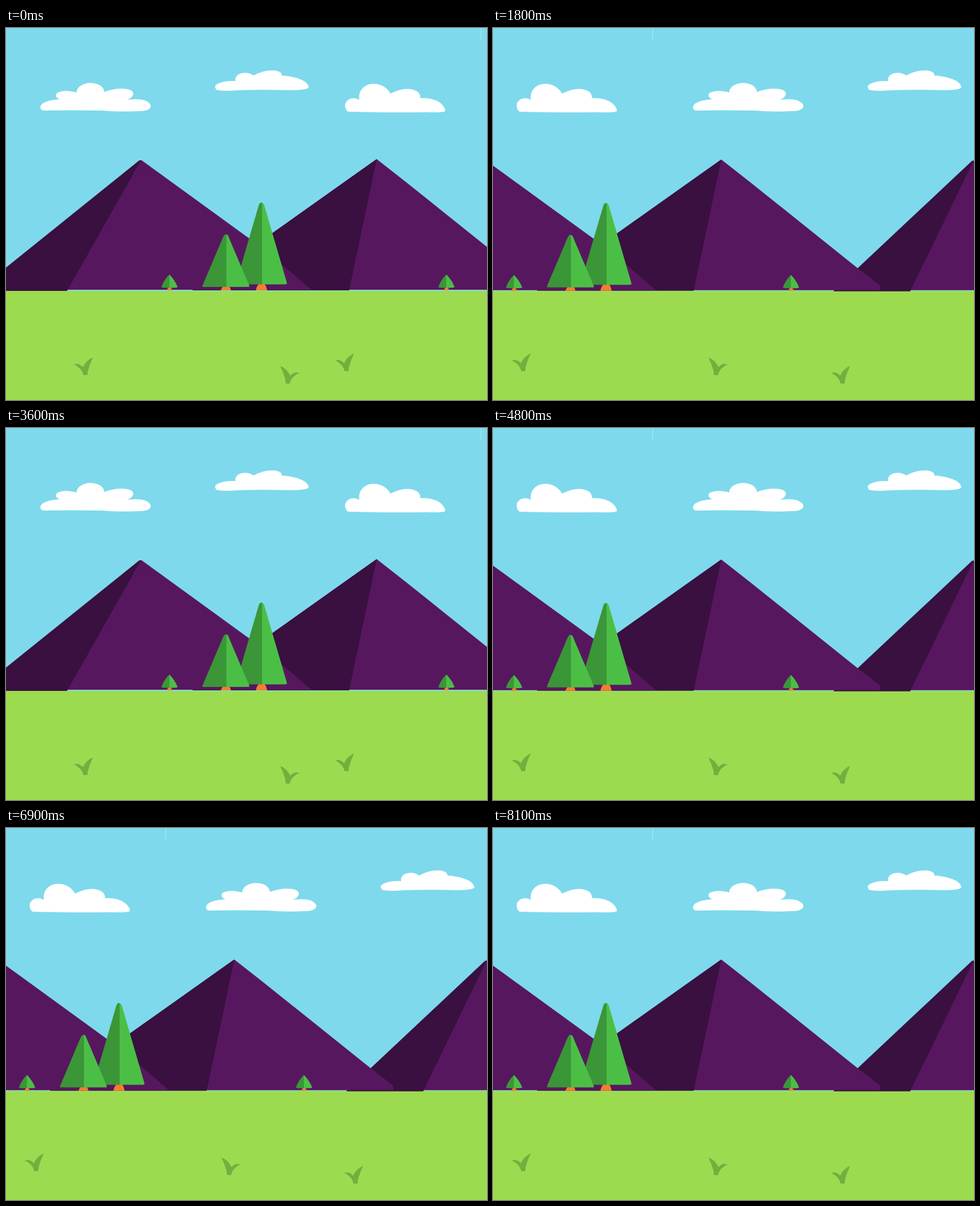
Recreate the animation shown at these times as an HTML page. Size 851x658 px, loop 8400 ms.

```html
<!DOCTYPE html>
<html lang="en">
<head>
<meta charset="utf-8">
<title>Mountain landscape</title>
<style>
  html, body { margin: 0; width: 100%; height: 100%; overflow: hidden; background: #7ed9ec; }
  svg { display: block; width: 851px; height: 658px; }
  .view { animation: 2100ms step-end infinite; }
  #near { animation-name: near; }
  #mid { animation-name: mid; }
  #far { animation-name: far; }
  .dark { fill: #39103f; }
  .plum { fill: #57175f; }
  .shade { fill: #3b9638; }
  .leaf { fill: #4bbf45; }
  .trunk { fill: #f57c32; }
  .tuft { fill: #74ae3e; }
  /* Seven equal beats: near mid far near mid near far */
  @keyframes near {
    0%, 42.857%, 71.429% { visibility: visible; }
    14.286%, 57.143%, 85.714%, 100% { visibility: hidden; }
  }
  @keyframes mid {
    0%, 28.571%, 71.429%, 100% { visibility: hidden; }
    14.286%, 57.143% { visibility: visible; }
  }
  @keyframes far {
    0%, 42.857%, 100% { visibility: hidden; }
    28.571%, 85.714% { visibility: visible; }
  }
</style>
</head>
<body>
<svg viewBox="0 0 851 658">
  <defs>
    <g id="clouds">
      <g fill="#fff">
        <path d="M65 146Q57 142 64 134Q74 127 95 126Q85 122 90 115Q102 108 125 114C126 93 171 91 174 113Q196 105 214 108Q229 111 224 120Q221 125 214 127Q238 124 248 129Q257 134 256 139Q254 147 235 147Q200 149 170 146Q110 145 65 146Z"/>
        <path d="M372 109Q367 103 374 99Q385 93 406 94C403 79 427 75 438 84Q455 74 475 75Q489 77 488 84Q515 86 529 95Q537 102 535 106Q530 110 500 110Q440 108 395 111Q376 111 372 109Z"/>
        <path d="M605 148Q599 144 600 134Q604 124 616 124Q621 125 625 127C621 93 667 90 680 116Q700 106 715 108Q734 111 733 124Q757 123 769 133Q778 141 777 147Q774 150 745 149Q670 150 605 148Z"/>
      </g>
      <path d="M789.5 17.5h1v1h-1z" fill="#5a9fb0"/>
    </g>
    <path id="streak" d="M840 0h1v23h-1z" fill="#b4e6f0"/>

    <g id="sapling">
      <path class="trunk" d="M-4 464Q-3 459 0 458Q4 459 5 464Z"/>
      <path class="shade" d="M0 436Q-10 446 -14 458Q-14 460 0 459.500Z"/>
      <path class="leaf" d="M0 436Q10 446 14.500 458Q14 460 0 459.500Z"/>
    </g>

    <g id="land">
      <path class="plum" d="M656 232L707 272L897 424L937 455V463H330Z"/>
      <path class="dark" d="M656 232L654 233L330 463V464H607Z"/>
      <path class="plum" d="M237 234H240L430 372L488 418L540 463H108Z"/>
      <path class="dark" d="M239 234H236L-50 464V465H108Z"/>
      <use href="#sapling" x="289"/>
      <use href="#sapling" x="779"/>
      <path class="trunk" d="M442 464Q444 455 448 452H457Q460 455 462 464Z"/>
      <path class="shade" d="M453 309Q449 308 447 314L407 451Q407 453.500 410 453.500H453Z"/>
      <path class="leaf" d="M453 309Q456 310 457 314L497 451Q497 453.500 494 453.500H453Z"/>
      <path class="trunk" d="M380 464Q382 459 385 456H394Q397 459 398 464Z"/>
      <path class="shade" d="M390 365Q386 365 384 370L347.500 456Q347 458 350 458H390Z"/>
      <path class="leaf" d="M390 365Q393 366 394 370L430.500 456Q431 458 428 458H390Z"/>
    </g>

    <path id="tuft" class="tuft" d="M0 12Q10 9 16 17Q23 3 34 0Q28 12 27 17Q24 24 24 31H17Q14 18 0 12Z"/>
    <use id="tuft-flip" href="#tuft" transform="matrix(-1 0 0 1 34 0)"/>
  </defs>

  <rect width="851" height="658" fill="#7ed9ec"/>
  <rect y="465" width="851" height="193" fill="#9cdb50"/>

  <g id="near" class="view">
    <use href="#clouds"/>
    <use href="#streak"/>
    <use href="#land"/>
    <use href="#tuft" x="120" y="583"/>
    <use href="#tuft-flip" x="485" y="598"/>
    <use href="#tuft" x="582" y="576"/>
  </g>

  <g id="mid" class="view">
    <use href="#clouds" x="-298.500"/>
    <use href="#clouds" x="563"/>
    <use href="#land" transform="matrix(.857 0 0 1 136 .7)"/>
    <use href="#land" x="-761" y=".7"/>
    <use href="#tuft-flip" x="255" y="568"/>
    <use href="#tuft" x="438" y="583"/>
    <use href="#tuft-flip" x="803" y="598"/>
  </g>

  <g id="far" class="view">
    <use href="#clouds" x="-558"/>
    <use href="#clouds" x="293"/>
    <use href="#streak" x="-558"/>
    <use href="#land" transform="matrix(.857 0 0 1 645.500 .7)"/>
    <use href="#land" x="-252" y=".7"/>
    <use href="#tuft" x="33" y="576"/>
    <use href="#tuft-flip" x="381" y="583"/>
    <use href="#tuft" x="598" y="598"/>
  </g>
</svg>
</body>
</html>
```
